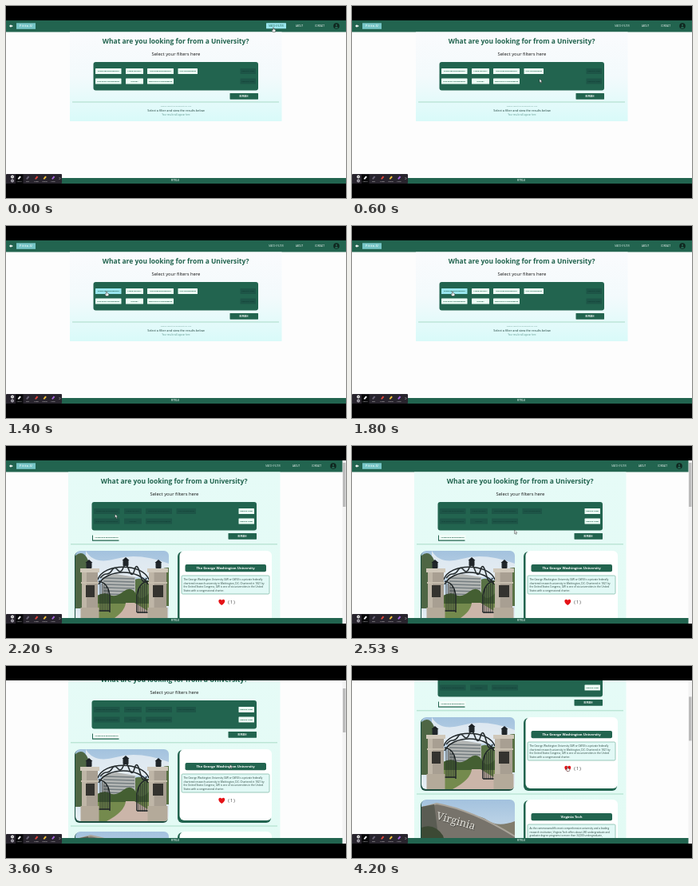
Animation, 426 px wide and 240 px high, one loop 4.27 s. Source, as an HTML page:

```html
<!DOCTYPE html>
<html lang="en">
<head>
<meta charset="utf-8">
<title>University filter</title>
<style>
html, body { margin: 0; width: 100%; height: 100%; overflow: hidden; background: #000; }
svg { display: block; width: 100%; height: 100%; font-family: "Open Sans", "Noto Sans", sans-serif; }
</style>
</head>
<body>
<svg id="stage" viewBox="0 0 426 240"></svg>
<script>
const LOOP = 4270, STEP = 1000 / 15, CLICK = 2060;
const GREEN = '#22644f', DARK = '#1d5547', DIM = '#143f36', PALE = '#edfdf6', CYAN = '#98e5ed';

const rect = (x, y, w, h, fill, r = 0, extra = '') =>
  `<rect x="${x}" y="${y}" width="${w}" height="${h}" rx="${r}" fill="${fill}" ${extra}/>`;
const text = (x, y, size, str, fill, extra = 'text-anchor="middle"') =>
  `<text x="${x}" y="${y}" font-size="${size}" fill="${fill}" ${extra}>${str}</text>`;
const path = (d, fill, extra = '') => `<path d="${d}" fill="${fill}" ${extra}/>`;
const line = (d, stroke, width) => path(d, 'none', `stroke="${stroke}" stroke-width="${width}"`);
const circle = (x, y, r, fill) => `<circle cx="${x}" cy="${y}" r="${r}" fill="${fill}"/>`;
const group = (id, body) => `<g id="${id}">${body}</g>`;
const BOLD = 'text-anchor="middle" font-weight="700"';
const LEFT = 'text-anchor="start"';

const button = (x, y, w, label, fill, ink, id = '') =>
  rect(x, y, w, 7, fill, .6, id && `id="${id}"`) +
  text(x + w / 2, y + 4.3, 2.15, label, ink, BOLD);

const FILTERS = [
  [112, 78, 32.5, 'COMPUTER ENGINEERING'], [150, 78, 22, 'CYBER SECURITY'],
  [177, 78, 33, 'SOFTWARE ENGINEERING'], [215.5, 78, 24.5, 'CIVIL ENGINEERING'],
  [112, 90.5, 32.5, 'ELECTRICAL ENGINEERING'], [150, 90.5, 22, 'HISTORY'],
  [177, 90.5, 33, 'MECHANICAL ENGINEERING']
];

function filterPanel(chosen) {
  const [bg, ink] = chosen ? [DARK, DIM] : [PALE, GREEN];
  const [offBg, offInk] = chosen ? [PALE, GREEN] : [DARK, DIM];
  return text(212.7, 47.2, 8.45, 'What are you looking for from a University?', GREEN, BOLD) +
    text(213, 62.3, 5.84, 'Select your filters here', '#111') +
    rect(109.5, 70, 206.5, 35.5, GREEN, 3) +
    FILTERS.map(([x, y, w, label], i) =>
      button(x, y, w, label, bg, ink, !chosen && i === 0 ? 'firstFilter' : '')).join('') +
    [78, 90.5].map(y => button(293.5, y, 19.5, 'REMOVE LABEL', offBg, offInk)).join('') +
    rect(280.5, 109, 35.5, 7.7, GREEN, .6) + text(298, 113.7, 2.5, 'REFRESH', '#fff', BOLD);
}

const header = (shift, hover = '') =>
  rect(0, 18, 426, 14.5, GREEN) +
  path('M4 25l2.3-2v1.2h2v1.6h-2V27z', '#fff') +
  rect(13, 21.3, 24, 7.5, '#76c5c6') +
  text(25, 26.2, 3.1, 'F i t t o - U', '#fff', BOLD) +
  `<g transform="translate(${shift})">` + hover +
  text(338.5, 26, 2.75, 'MATCH FILTER', '#dcefe9', hover ? 'text-anchor="middle" id="navLabel"' : undefined) +
  text(367.5, 26, 2.75, 'ABOUT', '#fff') + text(393, 26, 2.75, 'CONTACT', '#fff') +
  circle(414, 25, 3.8, '#10261f') + circle(414, 23.9, 1.1, GREEN) +
  path('M411.8 27.2q2.2-3.2 4.4 0q-2.2 1.8-4.4 0', GREEN) + '</g>';

const emptyView =
  rect(0, 18, 426, 204, '#fdfdfd') +
  header(0, rect(326, 21.3, 25, 7, CYAN, .4, 'id="navHover"')) +
  rect(80, 32.5, 265.5, 111.5, 'url(#wash)') + filterPanel(false) +
  line('M83 120H342', '#9bd3ba', .8) +
  text(213, 126, 2.4, 'Please select the university for you', '#6b9c93') +
  text(213, 132, 3.85, 'Select a filter and view the results below', '#173b34') +
  text(213, 136.7, 2.65, 'Your results will appear here', '#5f978e');

function gatePhoto() {
  const pillar = (x, w, top) =>
    rect(x, top, w, 221 - top, '#a89f92') + rect(x, top, w * .3, 221 - top, '#bfb6a7') +
    rect(x - 2, top - 2, w + 4, 5, '#d0c8ba') + rect(x - 1, top + 15, w + 2, 2, '#c8bfaf') +
    rect(x - 1.5, 202, w + 3, 19, '#b4aa9a') + rect(x + 5, 174, w - 9, 15, '#34332f');
  const lantern = (x, y) =>
    rect(x - 3.5, y, 7, 8, '#20262a', 1) + path(`M${x - 4.5} ${y + 1}l4.5-4 4.5 4z`, '#1b2024');
  let bars = '', windows = '';
  for (let i = 0; i < 5; i++) bars += `M${118 + i * 2.4} ${170 + i * 2}V207M${176 - i * 2.4} ${170 + i * 2}V209`;
  for (let y = 165; y < 186; y += 4) windows += `M122 ${y}L161 ${y + 1}`;
  return rect(87, 131, 117, 90, 'url(#sky)') +
    path('M100 131q10 18 38 10t66 6v17H100z', '#f4f7f8', 'opacity=".7"') +
    path('M87 137q10-8 16 6l3 60H87z', '#4e6644') +
    path('M155 172q8-9 17-5t16-6 16-9v48h-49z', '#587244') +
    path('M120 164l18-4 24 4v26h-42z', '#b4b7b5') + line(windows, '#747d80', 1.4) +
    path('M114 187q9-5 16-1t17-4 16 3 17-2v19h-66z', '#445f32') +
    path('M114 197h66v24h-66z', '#748a4d') +
    path('M150 196l11 0 20 12v13h-55q23-12 24-25z', '#cbb5a9') +
    line(bars, '#24292a', .8) +
    line('M115 167C122 146 171 146 179 167M116 173C126 153 168 153 178 173', '#1f2527', 1.5) +
    line('M118 165q4-5 8-5t7-5 7 0 7-3 7 3 7 0 7 5 8 5', '#293032', 1.6) +
    line('M116 169q12 2 14 18v21M178 169q-12 2-14 18v21M116 206h14m34 2h14', '#202628', 1.5) +
    pillar(95, 20, 155) + pillar(179, 22, 155) +
    lantern(104, 145) + lantern(150, 142) + lantern(191, 145);
}

const signPhoto = () =>
  rect(87, 234, 117, 90, 'url(#sky)') +
  path('M146 258q11-7 24 2t34 1v28h-58z', '#817d6d') +
  path('M87 244L106 239Q151 247 204 280V324H87z', '#77736b') +
  line('M87 244L106 239Q151 247 204 280', '#aaa59b', 2) +
  path('M87 243l16-3 4 31 34 53H87z', '#5a5c53') +
  path('M87 269q16-6 27 10l14 45H87z', '#3c4934') +
  `<g transform="translate(105 258) rotate(16)">` +
  text(.8, .8, 13, 'Virginia', '#45443f', 'font-family="Noto Serif, serif"') +
  text(0, 0, 13, 'Virginia', '#e3e2db', 'font-family="Noto Serif, serif"') + '</g>';

function result(y, photo, clip, title, lines, votes) {
  const copy = lines.map((s, i) => text(222.5, y + 37 + i * 4.5, 3.09, s, '#2b463f', LEFT)).join('');
  return rect(86, y + 1, 117, 91, '#1d4e40', 6) +
    `<g clip-path="url(#${clip})">${photo}</g>` +
    rect(215, y + 1, 117, 91, GREEN, 6) + rect(217.5, y, 115.5, 89, '#fff', 6) +
    rect(224.5, y + 17, 101.5, 9.3, GREEN, 2) + text(275, y + 23.1, 4.25, title, '#fff', BOLD) +
    rect(220, y + 31, 110, 23, '#e2f9f6', 1.5, 'stroke="#73b49f" stroke-width=".7"') + copy +
    path(`M270.3 ${y + 68}c-7-4.5-3.2-9.4 0-6.2c3.2-3.2 7 1.7 0 6.2z`, '#e51217') +
    text(282.5, y + 66.2, 5, votes, '#222');
}

const resultView =
  rect(0, 18, 426, 600, '#fdfdfd') + header(-4) +
  rect(78, 32.5, 265.5, 585, 'url(#mint)') +
  `<g transform="translate(-2)">${filterPanel(true)}</g>` +
  rect(108, 111.5, 33.5, 7.2, GREEN, .5) + rect(109, 111, 33.5, 6.5, '#f2fdf8') +
  text(126, 115.2, 2.3, 'COMPUTER ENGINEERING', GREEN, BOLD) +
  line('M81 122.8H340M81 227H340', '#9bd3ba', .8) +
  result(131, gatePhoto(), 'clipA', 'The George Washington University', [
    'The George Washington University (GW or GWU) is a private federally',
    'chartered research university in Washington, D.C. Chartered in 1821 by',
    'the United States Congress, GW is one of six universities in the United',
    'States with a congressional charter.'], '( 1 )') +
  result(234, signPhoto(), 'clipB', 'Virginia Tech', [
    'As the commonwealth\u2019s most comprehensive university and a leading',
    'research institution, Virginia Tech offers about 280 undergraduate and',
    'graduate degree programs to more than 34,000 undergraduate,'], '( 0 )');

const TOOLS = [[16.5, 'Select', '#fff'], [27, 'Text', '#6b6478'], [38, 'Draw', '#e0463c'],
  [48.5, 'Stamp', '#f4c23c'], [59, 'Clear', '#a562dd']];
const toolbar =
  rect(0, 210, 70, 12, '#28242d', 1) + rect(12, 210.5, 9.5, 11.5, '#09090b') +
  circle(8, 213.5, 1.9, '#fff') + circle(8, 218.5, 1.9, '#bbb8c3') +
  circle(8, 213.5, .7, '#333') + circle(8, 218.5, .7, '#333') +
  TOOLS.map(([x, label, fill]) =>
    path(`M${x - 1.9} 216l2.6-3.6 1.7 1.4-2.8 3z`, fill) + text(x, 219.6, 2.2, label, '#eee')).join('') +
  line('M66.5 214l1.5 1.5-1.5 1.5', '#ddd', .5);

const gradient = (id, ...colors) => `<linearGradient id="${id}" x2="0" y2="1">` +
  colors.map((color, i) => `<stop offset="${i / (colors.length - 1)}" stop-color="${color}"/>`).join('') +
  '</linearGradient>';
const $ = id => document.getElementById(id);

$('stage').innerHTML = `<defs>
  ${gradient('wash', '#fafbfd', '#f3fafc', '#d9faf9')}${gradient('mint', '#e6fbf7', '#ddfaf0')}
  ${gradient('sky', '#a3c2de', '#eaf1f5')}
  <clipPath id="clipA">${rect(87, 131, 117, 90, '#000', 6)}</clipPath>
  <clipPath id="clipB">${rect(87, 234, 117, 90, '#000', 6)}</clipPath>
  <clipPath id="screen">${rect(0, 18, 426, 204, '#000')}</clipPath></defs>` +
  rect(0, 0, 426, 240, '#000') +
  `<g clip-path="url(#screen)">` +
  group('empty', emptyView) + group('results', resultView) +
  rect(0, 215, 426, 7, GREEN) + text(212, 219.4, 2.6, 'FITTO-U', '#d5e8e1', BOLD) +
  group('scrollbar', rect(421.5, 18, 4.5, 204, '#f3f3f3') + rect(422, 21, 3.5, 55, '#bcbcbc', 0, 'id="thumb"')) +
  toolbar + '</g>' +
  group('cursor',
    path('M0 0V4.7l1.1-1 .8 1.8.8-.4-.8-1.7h1.5z', '#fff', 'id="arrow" stroke="#111" stroke-width=".4"') +
    path('M-.6 0q.6-.7 1.2 0v2l2 .5q.6 1-.3 3H-.7l-1.5-2.1q.2-.8 1.6.1z', '#fff', 'id="hand" stroke="#111" stroke-width=".4"'));

const CURSOR = [[0, 335, 27], [130, 335, 27], [600, 235, 91], [1130, 136, 88], [1330, 126, 82],
  [2100, 126, 82], [2530, 203.5, 105], [3200, 268, 121], [3600, 280.5, 123], [4000, 270, 126], [4270, 270, 126]];
const SCROLL = [[0, 0], [3130, 0], [3330, 27], [3800, 27], [4000, 54], [4200, 67], [4270, 72]];

function along(keys, t) {
  const i = keys.findIndex(key => key[0] > t);
  const a = keys[i - 1], b = keys[i];
  const p = (t - a[0]) / (b[0] - a[0]);
  const eased = p * p * (3 - 2 * p);
  return a.slice(1).map((v, k) => v + (b[k + 1] - v) * eased);
}

const show = (id, visible) => $(id).setAttribute('display', visible ? 'inline' : 'none');

function render(time) {
  const t = Math.floor((time % LOOP) / STEP + .05) * STEP % LOOP;
  const chosen = t >= CLICK;
  const [x, y] = along(CURSOR, t), [scroll] = along(SCROLL, t);
  const onNav = y < 31, onFilter = !chosen && x < 144.5 && y < 85;
  const onHeart = t > 3950;
  show('empty', !chosen);
  show('results', chosen);
  show('scrollbar', chosen);
  show('navHover', onNav);
  $('navLabel').setAttribute('fill', onNav ? GREEN : '#dcefe9');
  $('firstFilter').setAttribute('fill', onFilter ? CYAN : PALE);
  $('results').setAttribute('transform', `translate(0 ${-scroll})`);
  $('thumb').setAttribute('y', 21 + scroll * .26);
  const pointing = onNav || onFilter || onHeart;
  show('hand', pointing);
  show('arrow', !pointing);
  $('cursor').setAttribute('transform', `translate(${x} ${y})`);
}

const start = performance.now();
function tick() {
  render(performance.now() - start);
  requestAnimationFrame(tick);
}
render(0);
requestAnimationFrame(tick);
</script>
</body>
</html>
```
